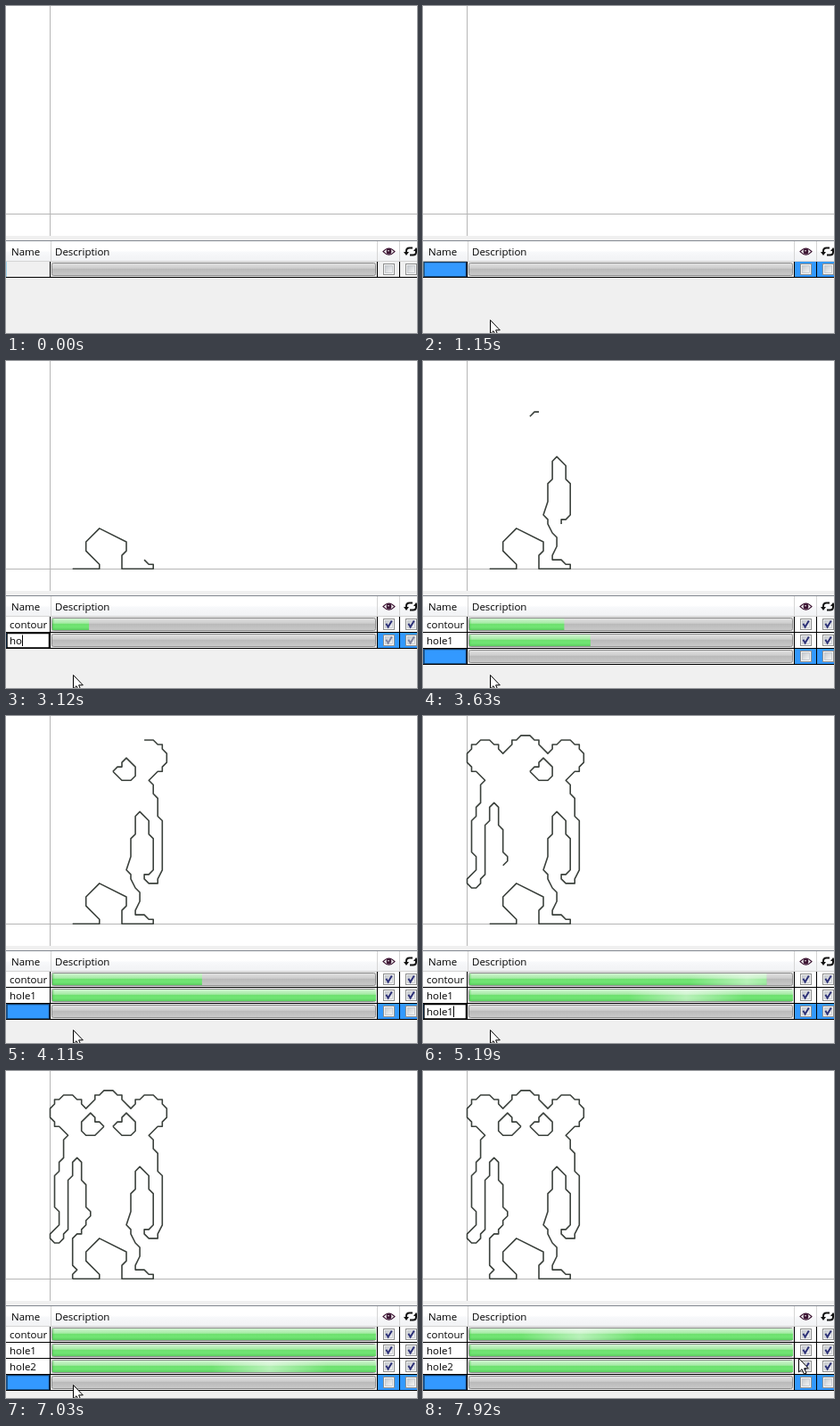
Write an HTML page that moves like this. It is 461 by 367 pixels and loops after 7.99 s.

```html
<!DOCTYPE html>
<html lang="en">
<head>
<meta charset="utf-8">
<title>Outline table</title>
<style>
html, body { margin: 0; width: 100%; height: 100%; overflow: hidden; background: #f0f0f0; }
svg { display: block; width: 461px; height: 367px; }
text { font: 11.5px "Open Sans", "Noto Sans", sans-serif; fill: #000; white-space: pre; }
</style>
</head>
<body>
<svg id="stage" viewBox="0 0 461 367">
  <defs>
    <linearGradient id="head" x2="0" y2="1">
      <stop offset="0" stop-color="#fff"/><stop offset=".45" stop-color="#fff"/>
      <stop offset=".55" stop-color="#f7f8fa"/><stop offset="1" stop-color="#f1f2f4"/>
    </linearGradient>
    <linearGradient id="gray" x2="0" y2="1">
      <stop offset="0" stop-color="#e2e2e2"/><stop offset=".4" stop-color="#cecece"/>
      <stop offset=".5" stop-color="#bababa"/><stop offset="1" stop-color="#cacaca"/>
    </linearGradient>
    <linearGradient id="green" x2="0" y2="1">
      <stop offset="0" stop-color="#d2f5d2"/><stop offset=".4" stop-color="#a5eba5"/>
      <stop offset=".5" stop-color="#6fe070"/><stop offset=".75" stop-color="#70e673"/>
      <stop offset="1" stop-color="#5ccc60"/>
    </linearGradient>
    <linearGradient id="glare">
      <stop offset="0" stop-color="#fff" stop-opacity="0"/>
      <stop offset=".5" stop-color="#fff" stop-opacity=".5"/>
      <stop offset="1" stop-color="#fff" stop-opacity="0"/>
    </linearGradient>
    <linearGradient id="box" x2="1" y2="1">
      <stop offset="0" stop-color="#c6cace"/><stop offset="1" stop-color="#f6f6f6"/>
    </linearGradient>
  </defs>

  <rect width="461" height="367" fill="#f0f0f0"/>
  <rect width="461" height="258" fill="#fff"/>
  <path d="M49.5 0V258M0 233.5H461" stroke="#b6b6b6"/>
  <g fill="none" stroke="#3b413c" stroke-width="1.6" stroke-linejoin="round">
    <polyline id="line0"/><polyline id="line1"/><polyline id="line2"/>
  </g>

  <path d="M0 263.5H461" stroke="#828790"/>
  <rect y="264" width="461" height="23" fill="url(#head)"/>
  <path d="M50.5 264V287M416.5 264V287M441.5 264V287M0 286.5H461" stroke="#d5d5d5"/>
  <text x="6" y="280">Name</text>
  <text x="55" y="280">Description</text>
  <g fill="none" stroke="#3a1230" stroke-width="1.2">
    <path d="M423 275.7Q429.500 268.500 436 275.700Q429.500 282.500 423 275.700Z"/>
    <circle cx="429.500" cy="275.500" r="2.300" fill="#3a1230"/>
  </g>
  <circle cx="429" cy="274.700" r=".8" fill="#fff"/>
  <g id="sync">
    <path d="M449 277.500V275Q449 271.500 452.500 271.500H456" fill="none" stroke="#111" stroke-width="2"/>
    <path d="M446 276H452L449 280Z" fill="#111"/>
  </g>
  <use href="#sync" transform="rotate(180 454.500 275.500)"/>

  <g id="rows"></g>
  <path id="cursor" d="M.5 .5V16L4 12.700L6.500 18.200L9 17.100L6.600 11.800H11.300Z" fill="#fff" stroke="#000"/>
</svg>
<script>
const LOOP = 7990, BAR_X = 52, BAR_W = 363;
const $ = id => document.getElementById(id);
const set = (el, attrs) => { for (const k in attrs) el.setAttribute(k, attrs[k]); };
const clamp = v => Math.max(0, Math.min(1, v));
const parse = s => s.trim().split(/\s+/).map(p => p.split(',').map(Number));
const mirror = pts => pts.map(([x, y]) => [26 - x, y]);

// The figure on a unit grid, y up; the head is symmetrical about x = 13.
const foot = parse('5,0 11,0 11,1 8,4 8,6 11,9 17,6 17,4 16,3 16,0 23,0 23,1 22,1 21,2');
const rightArm = parse(`19,2 19,3 20,5 20,7 19,8 18,10 18,11 17,12 18,15 18,19 19,20 19,24
  20,25 22,23 22,20 23,19 23,12 22,11 21,11 21,10 22,9 24,9 24,10 25,12 25,23 24,24 24,28 23,29 23,31`);
const ear = parse('22,32 24,34 25,34 25,35 26,36 26,38 25,39 25,40 24,40 23,41 21,41');
const brow = parse('20,40 19,40 19,39 18,38 16,40 16,41 15,41 14,42');
const leftArm = parse(`3,31 3,27 2,26 2,24 1,23 1,16 2,15 2,12 0,10 0,9 1,8 2,8 3,9 3,10
  4,11 4,22 5,23 5,26 6,27 7,26 7,22 8,21 8,16 9,15 9,14 8,13`);
const leftLeg = parse('8,12 7,11 7,10 6,10 5,9 5,3 6,2 5,1 5,0');
const eye = parse('14,34 15,35 16,35 16,36 17,37 19,35 19,33 18,32 16,32 14,34');

const parts = [foot, rightArm.concat(ear),
  brow.concat(mirror(brow).reverse(), mirror(ear).reverse(), leftArm), leftLeg];
const shapes = [parts.flat(), eye, mirror(eye)];
const reach = [0];
parts.forEach((p, i) => reach.push(reach[i] + p.length));

const drawTimes = [2790, 3120, 4110, 5190, 5400];
const barLevels = [0, .113, .462, .918, 1];
function ramp(t, times, values) {
  if (t <= times[0]) return values[0];
  for (let i = 1; i < times.length; i++) {
    if (t < times[i]) {
      const k = (t - times[i - 1]) / (times[i] - times[i - 1]);
      return values[i - 1] + k * (values[i] - values[i - 1]);
    }
  }
  return values[values.length - 1];
}

const typing = (word, start, gap) => [...word].map((c, i) => [start + i * gap, word.slice(0, i + 1)]);
const rows = [
  { show: 0, select: 700, commit: 2790, keys: typing('contour', 1850, 80), glares: [4250, 7450] },
  { show: 2790, select: 2790, commit: 3500, keys: typing('hole1', 3040, 80), glares: [4420], done: 3850 },
  { show: 3500, select: 3500, commit: 5490,
    keys: [...typing('hole1', 4490, 78), [5270, 'hole'], [5350, 'hole2']], glares: [6260], done: 5850 },
  { show: 5490, select: 5490, commit: Infinity, keys: [], glares: [] }
];

const checkbox = x => `<rect x="${x}.500" y="2.500" width="12" height="12" fill="#f6f6f6" stroke="#8e8f8f"/>
  <rect x="${x + 2}.500" y="4.500" width="8" height="8" fill="url(#box)" stroke="#b8bcc2" stroke-width=".7"/>
  <path class="tick" d="M${x + 3.4} 7.800L${x + 5.6} 11.500L${x + 9.8} 4.600" fill="none" stroke-width="2"/>`;

rows.forEach((row, i) => {
  const y = 287 + 18 * i;
  $('rows').insertAdjacentHTML('beforeend', `<g transform="translate(0 ${y})">
    <rect class="cell" width="461" height="17"/>
    <rect class="side" width="1" height="17" fill="#9fd4ee"/>
    <path d="M0 17.500H461M49.500 0V18M416.500 0V18M441.500 0V18" stroke="#000"/>
    <path class="frame" d="M1 .5H48.500V17H1Z" fill="none" stroke="#000" stroke-width="1.500"/>
    <rect x="50" width="366" height="17" fill="#e4e4e4"/>
    <rect x="51.500" y="1.500" width="363" height="14" rx="2" fill="url(#gray)" stroke="#8c8c8c"/>
    <svg class="fill" x="${BAR_X}" y="2" height="13">
      <rect width="${BAR_W}" height="13" fill="url(#green)"/>
      <rect width="2" height="13" fill="#4fbf55" opacity=".3"/>
      <rect class="glare" width="130" height="13" fill="url(#glare)"/>
    </svg>
    ${checkbox(423)}${checkbox(448)}
    <text x="4" y="13"></text>
    <path class="caret" stroke="#000"/>
  </g>`);
  row.el = $('rows').lastElementChild;
  row.ui = {};
  for (const c of ['cell', 'side', 'frame', 'fill', 'glare', 'caret']) row.ui[c] = row.el.querySelector('.' + c);
  row.ui.text = row.el.querySelector('text');
  row.ui.ticks = row.el.querySelectorAll('.tick');
});

function drawRow(row, i, t, level) {
  const ui = row.ui;
  row.el.style.display = t >= row.show ? '' : 'none';
  if (t < row.show) return;
  const started = row.keys.length > 0 && t >= row.keys[0][0];
  const done = t >= row.commit, editing = started && !done;
  const selected = t >= row.select && !done;
  let word = '';
  for (const [at, s] of row.keys) if (t >= at) word = s;

  ui.cell.setAttribute('fill', done ? '#fff' : selected ? '#3399ff' : '#f0f0f0');
  ui.side.style.display = i === 0 && !done ? '' : 'none';
  set(ui.frame, { fill: editing ? '#fff' : 'none', 'stroke-opacity': editing ? 1 : selected ? .6 : 0 });
  if (ui.text.textContent !== word) ui.text.textContent = word;
  ui.caret.style.display = editing ? '' : 'none';
  if (editing) {
    const x = Math.round(4 + ui.text.getComputedTextLength()) + .5;
    ui.caret.setAttribute('d', `M${x} 2.500V15`);
  }
  const fade = started ? clamp((t - row.keys[0][0] + 80) / 320) : 0;
  const tone = Math.round(150 * (1 - fade));
  ui.ticks.forEach(el => set(el, {
    stroke: `rgb(${46 + tone * .65},${50 + tone * .65},${120 + tone * .2})`,
    opacity: started ? .5 + .5 * fade : 0
  }));

  ui.fill.style.display = level > 0 ? '' : 'none';
  ui.fill.setAttribute('width', BAR_W * level);
  const from = row.glares.filter(g => g <= t).pop();
  ui.glare.setAttribute('x', from === undefined ? -200 : -130 + (t - from) * .4);
}

function drawLine(i, count) {
  const pts = shapes[i].slice(0, Math.floor(count + 1e-6));
  $('line' + i).setAttribute('points',
    pts.map(([x, y]) => `${(49.5 + x * 5.03).toFixed(1)},${(233.2 - y * 5.03).toFixed(1)}`).join(' '));
}

function drawCursor(t) {
  const ease = (a, b) => { const k = clamp((t - a) / (b - a)); return k * k * (3 - 2 * k); };
  const enter = ease(150, 700), leave = ease(830, 1130), last = ease(7130, 7920);
  let x = 462 - 442 * enter, y = 332 - 37 * enter;
  x += (75 - x) * leave;
  y += (352 - y) * leave;
  x += 346 * last;
  y -= 30 * last;
  $('cursor').style.display = t < 150 ? 'none' : '';
  $('cursor').setAttribute('transform', `translate(${Math.round(x)} ${Math.round(y)})`);
}

function render(t) {
  rows.forEach((row, i) => {
    let level = 0;
    if (i === 0) {
      level = ramp(t, drawTimes, barLevels);
      drawLine(0, ramp(t, drawTimes, reach));
    } else if (row.done) {
      level = clamp((t - row.commit) / (row.done - row.commit));
      drawLine(i, level * eye.length);
    }
    drawRow(row, i, t, level);
  });
  drawCursor(t);
}

const began = performance.now();
function tick() {
  render((performance.now() - began) % LOOP);
  requestAnimationFrame(tick);
}
tick();
</script>
</body>
</html>
```
